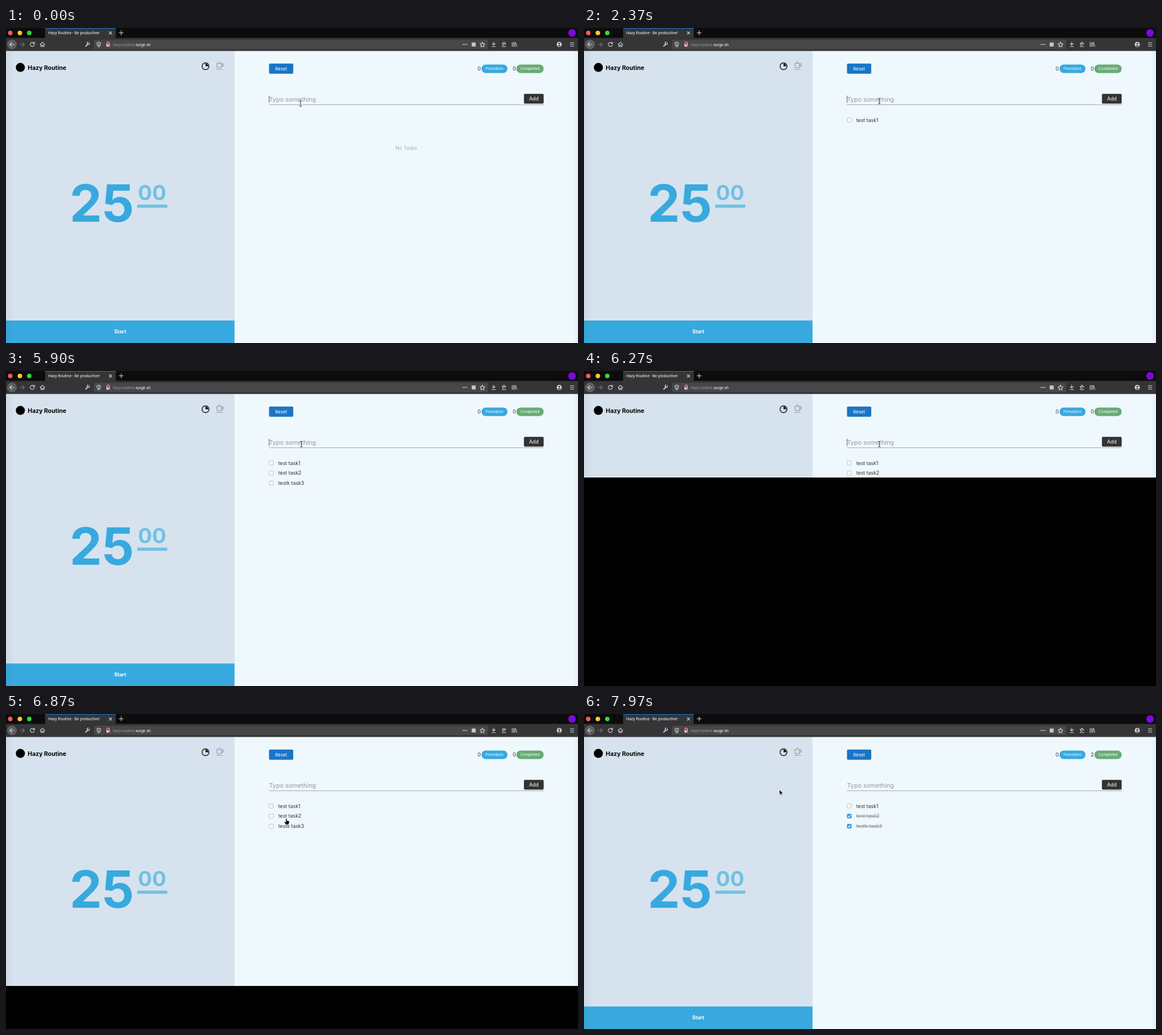
Recreate the animation shown at these times as an HTML page. Size 1008 by 556 pixels, loop 8 s.

```html
<!DOCTYPE html>
<html lang="en">
<head>
<meta charset="utf-8">
<title>Hazy Routine - Be productive!</title>
<style>
  html, body { margin: 0; width: 100%; height: 100%; overflow: hidden; background: #000; }
  svg { display: block; width: 100vw; height: 100vh; }
  text { font-family: Inter, sans-serif; font-size: 8.8px; fill: #333; white-space: pre; }
  .chrome text { font: 7px Roboto, sans-serif; fill: #f9f9fa; }
  .icon { fill: none; stroke: #d2d2d4; stroke-width: 1.1; stroke-linecap: round; stroke-linejoin: round; }
  .mid { text-anchor: middle; }
  .bold { font-weight: 700; }
  .light { fill: #fff; }
  .pill { font-size: 6.5px; fill: #fff; text-anchor: middle; }
  .field { font-size: 10.92px; }
  .done text { fill: #7d8488; text-decoration: line-through; }
  .box { fill: #f7fbfd; stroke: #aeb5b9; stroke-width: .8; }
  .done .box { fill: #3795de; stroke: #3795de; }
  .tick { fill: none; stroke: #fff; stroke-width: 1.3; visibility: hidden; }
  .done .tick { visibility: inherit; }
</style>
</head>
<body>
<svg viewBox="0 0 1008 556" preserveAspectRatio="none">
  <defs>
    <linearGradient id="edge">
      <stop offset="0" stop-color="#456" stop-opacity=".07"/>
      <stop offset="1" stop-color="#456" stop-opacity="0"/>
    </linearGradient>
  </defs>

  <g class="chrome">
    <rect width="1008" height="18" fill="#0c0c0d"/>
    <rect y="17.5" width="1008" height="23" fill="#353537"/>
    <circle cx="7.5" cy="8.7" r="4" fill="#ff5a5a"/>
    <circle cx="24.4" cy="8.7" r="4" fill="#ffc72e"/>
    <circle cx="41" cy="8.7" r="4" fill="#2edb3f"/>
    <rect x="69" width="124.5" height="18" fill="#353537"/>
    <rect x="69" width="124.5" height="1" fill="#0a75d8"/>
    <text x="74.3" y="11.3">Hazy Routine - Be productive!</text>
    <circle cx="997.5" cy="8.7" r="6.7" fill="#7d08dc"/>
    <rect x="155" y="20.7" width="694.5" height="16.6" rx="1.5" fill="#474749"/>
    <text x="188.2" y="31.5"><tspan fill="#98989a">hazy-routine.</tspan>surge.sh</text>
    <circle cx="10.5" cy="29" r="8" fill="#5c5c5e" stroke="#707072" stroke-width=".8"/>
    <g class="icon">
      <path d="M181.8 6.5l4.6 4.6m0-4.6l-4.6 4.6M203 4.8v7.4m-3.7-3.7h7.4"/>
      <path d="M14.5 29H6.7m3.5-3.5L6.7 29l3.5 3.5"/>
      <path d="M24.5 29h7.8m-3.5-3.5l3.5 3.5-3.5 3.5" stroke="#77777a"/>
      <path d="M49.6 27.3a3.6 3.6 0 1 0 .3 2.5M50.3 24.8v2.9h-3"/>
      <path d="M60 29.2l4.2-4 4.2 4M61.5 28.5v4.3h1.8v-2.3h1.8v2.3h1.8v-4.3"/>
      <path d="M140.5 32.2l3.8-3.8" stroke-width="1.9"/>
      <path d="M147 26.2a2.1 2.1 0 1 1-2.2-1.4" stroke-width="1.4"/>
      <path d="M163.5 25l3.2 1c0 3.7-.8 5.7-3.2 7.2-2.4-1.5-3.2-3.5-3.2-7.2zM163.5 27v4"/>
      <path d="M178 28v-1.2a2 2 0 0 1 4 0V28"/>
      <rect x="177.5" y="28.5" width="5" height="3.8" fill="#d2d2d4"/>
      <path d="M176.7 25.5l7 7.2" stroke="#ff2b55" stroke-width="1.3"/>
      <path d="M805.8 29h.01m2.99 0h.01m2.99 0h.01" stroke-width="2.1"/>
      <path id="star" d="M839.7 24.8l1.3 2.8 3 .4-2.2 2.1.6 3.1-2.7-1.5-2.7 1.5.6-3.1-2.2-2.1 3-.4z"/>
      <path d="M859.5 24.8v5m-2.6-2.4l2.6 2.6 2.6-2.6M856.2 32.8h6.6"/>
      <path d="M877.5 24.7l1 2.2 2.5.3-1.8 1.8M877.5 24.7l-1 2.2-2.5.3 1.8 1.8-.4 2M874 32.8h7M877.5 29.5v1"/>
      <path d="M892 25.2v7.5m2.4-7.5v7.5m2.4-7.5v7.5m1.3-7l2 7"/>
      <path d="M994.5 26h6.2m-6.2 3h6.2m-6.2 3h6.2"/>
    </g>
    <rect x="820.7" y="25.6" width="7" height="7" fill="#c8c8ca"/>
    <circle cx="975" cy="29" r="4.5" fill="#d2d2d4"/>
    <path d="M972.2 31.6q2.8-2 5.6 0l-2.8 1.2z" fill="#353537"/>
    <circle cx="975" cy="27.8" r="1.5" fill="#353537"/>
  </g>

  <rect y="40.5" width="403" height="515.5" fill="#d6e3ee"/>
  <rect x="402.7" y="40.5" width="605.3" height="515.5" fill="#eff8fc"/>
  <rect y="516.3" width="402.7" height="39.7" fill="#38a9de"/>
  <rect y="40.5" width="15" height="515.5" fill="url(#edge)"/>
  <rect width="8" height="515.5" fill="url(#edge)" transform="translate(1008 40.5) scale(-1 1)"/>

  <circle cx="25.3" cy="69.6" r="8"/>
  <text class="bold" x="38.3" y="73.9" style="font-size:10.5px;fill:#000">Hazy Routine</text>
  <circle cx="351.6" cy="67.5" r="6.2" fill="none" stroke="#000" stroke-width="1.2"/>
  <circle cx="351.6" cy="67.5" r="4.8" fill="none" stroke="#000" stroke-width=".8" stroke-dasharray=".7 1.8"/>
  <path d="M351.6 67.5v-4.7a4.7 4.7 0 0 1 4.7 4.7z"/>
  <path d="M371.8 62.5h8v5.3q0 2.2-2.2 2.2h-3.6q-2.2 0-2.2-2.2zM379.8 63.3h2.8v4h-2.8M370.5 73h11.5M374 60.3h4"
    fill="none" stroke="#8d9aa4" stroke-width="1.2"/>
  <text class="bold mid" x="169" y="342" style="font-size:91px;fill:#38a9de">25</text>
  <text class="bold mid" x="257.5" y="304" style="font-size:37px;fill:#72c0e4">00</text>
  <rect x="231.3" y="311.7" width="53" height="5.6" fill="#72c0e4"/>
  <text class="bold light mid" x="201.2" y="539.3">Start</text>

  <rect x="463.5" y="62.8" width="42.7" height="18" rx="1.8" fill="#1a75c5"/>
  <text class="light mid" x="484.8" y="74.8" style="font-size:7.9px">Reset</text>
  <text x="831" y="75">0</text>
  <rect x="838" y="64.4" width="45.7" height="15" rx="7.5" fill="#38a9de"/>
  <text class="pill" x="860.8" y="74.3">Pomodoro</text>
  <text id="count" x="893" y="75">0</text>
  <rect x="899.5" y="64.4" width="48" height="15" rx="7.5" fill="#68ab76"/>
  <text class="pill" x="923.5" y="74.3">Completed</text>

  <text id="input" class="field" x="463.5" y="129.6"></text>
  <rect id="caret" y="119.5" width=".8" height="12.6" fill="#333"/>
  <rect x="463.3" y="135" width="484.2" height=".8" fill="#8b979d"/>
  <rect x="912.7" y="116.3" width="34.8" height="17.3" rx="1.8" fill="#333"/>
  <text class="light mid" x="930.1" y="128.2">Add</text>
  <text id="empty" class="mid" x="705.3" y="214.8" style="fill:#a2afb5">No Tasks</text>
  <g id="list"></g>

  <g id="mouse" stroke="#fff" stroke-linejoin="round">
    <g id="beam" fill="none">
      <path d="M-2-5q2 0 2 1.2q0-1.2 2-1.2M0-4v8M-2 5q2 0 2-1.2q0 1.2 2 1.2" stroke-width="2.2"/>
      <path d="M-2-5q2 0 2 1.2q0-1.2 2-1.2M0-4v8M-2 5q2 0 2-1.2q0 1.2 2 1.2" stroke="#222" stroke-width="1"/>
    </g>
    <path id="hand" stroke-width=".7" d="M-1 .8q0-1 1-1t1 1v3l3.3.7q1.2.3 1 1.6l-.6 2.6-.8 2.3h-4.6l-2.8-4q-.3-1.3.9-1.2l1.6 1z"/>
    <path id="arrow" stroke-width=".7" d="M0 0v9.2l2.1-1.9 1.4 3.1 1.6-.7-1.4-3h2.9z"/>
  </g>
  <rect id="blackout" width="1008" height="556"/>
</svg>

<script>
const LOOP = 8000, PLACEHOLDER = "Typo something";
const $ = id => document.getElementById(id);
const show = (el, on) => el.style.visibility = on ? "visible" : "hidden";

// Field content from each time on; an empty string follows Enter.
const typing = [
  [0, ""], [430, "t"], [700, "te"], [830, "test"], [1030, "test t"], [1200, "test tas"],
  [1570, "test task"], [1870, "test task1"], [2270, ""],
  [2630, "t"], [2930, "te"], [3130, "test"], [3330, "test ta"], [3500, "test task"], [3700, "test task2"], [4070, ""],
  [4230, "t"], [4330, "te"], [4430, "tes"], [4700, "testk"], [4930, "testk t"], [5200, "testk tas"],
  [5430, "testk task3"], [5800, ""]
];
const tasks = [
  { name: "test task1", added: 2270, done: Infinity },
  { name: "test task2", added: 4070, done: 6930 },
  { name: "testk task3", added: 5800, done: 7430 }
];
const blurAt = 6800;
const path = [
  [0, 519, 133.3], [30, 519, 133.3], [230, 520.5, 129], [6290, 520.5, 129], [6750, 494, 184.3],
  [6960, 494, 184.3], [7270, 495, 195], [7480, 495, 195], [7970, 344.3, 133.5], [LOOP, 344.3, 133.5]
];
const dropouts = [[6270, 188], [6870, 480]];
const dropoutLength = 30;

$("list").innerHTML = tasks.map((task, i) => `
  <g transform="translate(463.5 ${158.6 + i * 17.8})">
    <rect class="box" x=".4" y=".2" width="7.2" height="7.2" rx="1"/>
    <path class="tick" d="M1.9 3.9l1.6 1.6 2.8-3.5"/>
    <text x="16.3" y="6.9">${task.name}</text>
  </g>`).join("");
const rows = [...$("list").children];

function mouseAt(t) {
  const i = path.findIndex((p, k) => k && t <= p[0]);
  const [t0, x0, y0] = path[i - 1], [t1, x1, y1] = path[i];
  const u = (t - t0) / (t1 - t0), e = u * u * (3 - 2 * u);
  return [x0 + (x1 - x0) * e, y0 + (y1 - y0) * e];
}

function cursorAt(x, y) {
  if (x < 463) return "arrow";
  if (y > 115 && y < 136) return "beam";
  return y > 157 && x < 527 ? "hand" : "arrow";
}

function draw(t) {
  const value = typing.findLast(step => step[0] <= t)[1];
  const input = $("input");
  input.textContent = value || PLACEHOLDER;
  input.style.fill = value ? "#333" : "#929a9e";
  $("caret").setAttribute("x", 463.3 + (value ? input.getComputedTextLength() : 0));
  show($("caret"), t < blurAt);

  show($("empty"), t < tasks[0].added);
  tasks.forEach((task, i) => {
    show(rows[i], t >= task.added);
    rows[i].classList.toggle("done", t >= task.done);
  });
  $("count").textContent = tasks.filter(task => t >= task.done).length;

  const [x, y] = mouseAt(t), kind = cursorAt(x, y);
  $("mouse").setAttribute("transform", `translate(${x} ${y})`);
  for (const id of ["beam", "hand", "arrow"]) show($(id), id === kind);

  const dropout = dropouts.find(([start]) => t >= start && t < start + dropoutLength);
  show($("blackout"), dropout);
  if (dropout) $("blackout").setAttribute("y", dropout[1]);
}

const start = performance.now();
function tick() {
  draw((performance.now() - start) % LOOP);
  requestAnimationFrame(tick);
}
tick();
</script>
</body>
</html>
```
